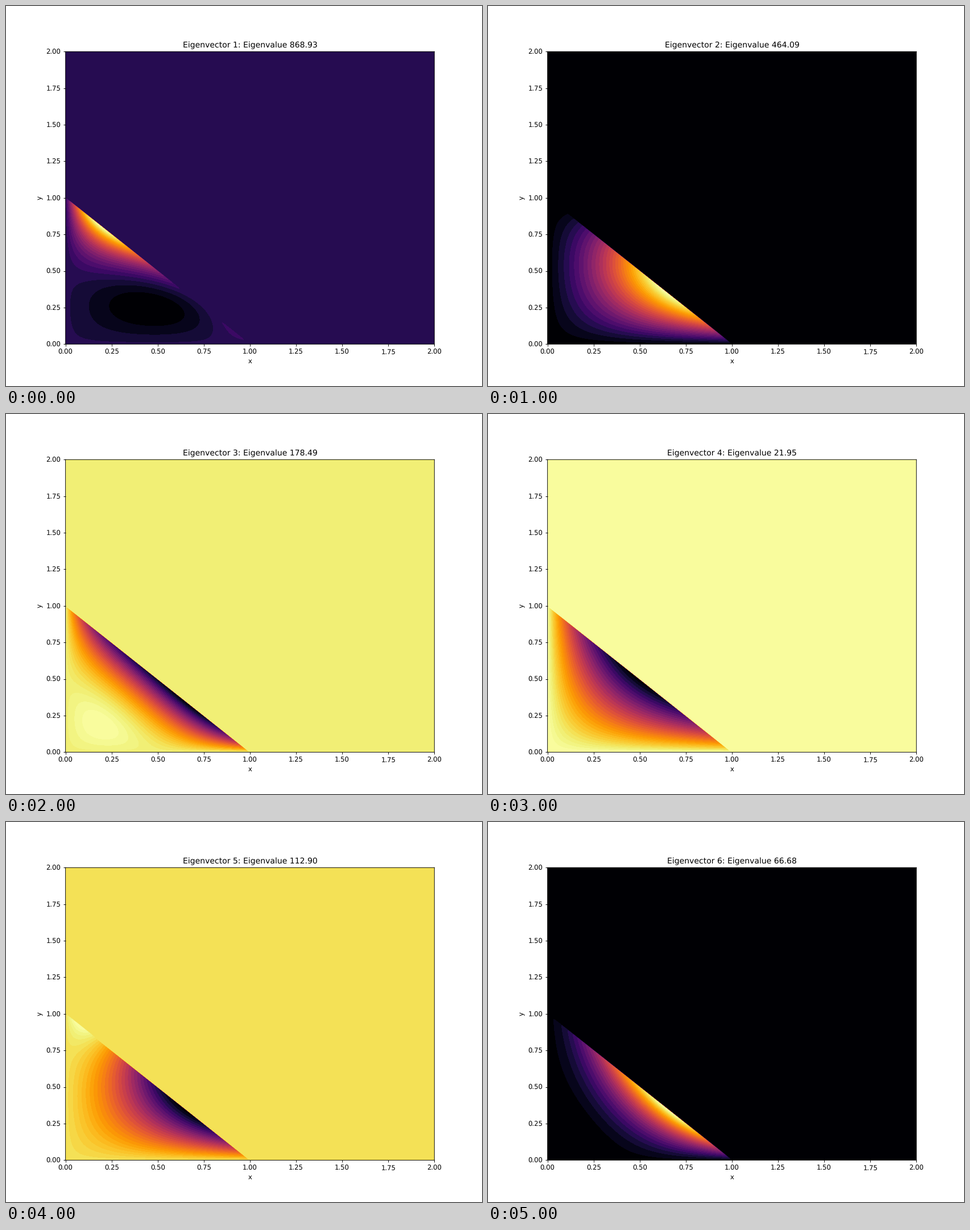
These frames come from a looping animation (837x669 px, 6000 ms). A matplotlib script:

```python
import numpy as np
import matplotlib.pyplot as plt
from matplotlib.animation import FuncAnimation

plt.rcParams.update({"path.snap": False, "text.hinting": "none"})

DPI = 83.7
EPS = 1e-6  # keeps the pixel size from rounding down
BANDS = 34

# Each mode is x*y times a quadratic on the triangle x + y <= 1.
MODES = [
    (868.93, lambda x, y: (1 - x - y) * (0.65 * y - 0.7 * x - 2.6 * (1 + x + y))
        + 1.48 * x**2 - 8 * x * y + 10.24 * y**2),
    (464.09, lambda x, y: 0.5 + 0.4 * x - 0.15 * x**2 - 0.2 * x * y - 0.6 * y**2),
    (178.49, lambda x, y: 0.8 - 1.08 * x - 1.39 * y
        - 1.55 * x**2 + 0.66 * x * y - 0.77 * y**2),
    (21.95, lambda x, y: -np.ones_like(x)),
    (112.90, lambda x, y: (y - 0.715 - 0.735 * x) * (0.62 + 0.06 * x + 0.76 * y)),
    (66.68, lambda x, y: x + 0.1 - (1 - x - y) * (0.61 + 0.53 * x - 0.51 * y)),
]

# Bands get narrower towards the bright end.
s = np.linspace(0, 1, BANDS + 1)
edges = s + 0.65 * s * (1 - s)
colors = plt.get_cmap("inferno")(edges[:-1])
edges[0], edges[-1] = -0.01, 1.01

grid = np.linspace(0, 2, 500)
X, Y = np.meshgrid(grid, grid)


def field(shape):
    u = np.where(X + Y <= 1, X * Y * shape(X, Y), 0)
    return (u - u.min()) / np.ptp(u)


fields = [field(shape) for _, shape in MODES]

fig, ax = plt.subplots(
    figsize=((837 + EPS) / DPI, (669 + EPS) / DPI), dpi=DPI, facecolor="white"
)


def draw(i):
    ax.clear()
    ax.contourf(X, Y, fields[i], levels=edges, colors=colors)
    ax.set(xlim=(0, 2), ylim=(0, 2), xlabel="x", ylabel="y")
    ax.set_title(f"Eigenvector {i + 1}: Eigenvalue {MODES[i][0]:.2f}")
    return []


anim = FuncAnimation(
    fig, draw, frames=len(MODES), init_func=lambda: draw(0),
    interval=1000, repeat=True, repeat_delay=0,
)
plt.show()
```
